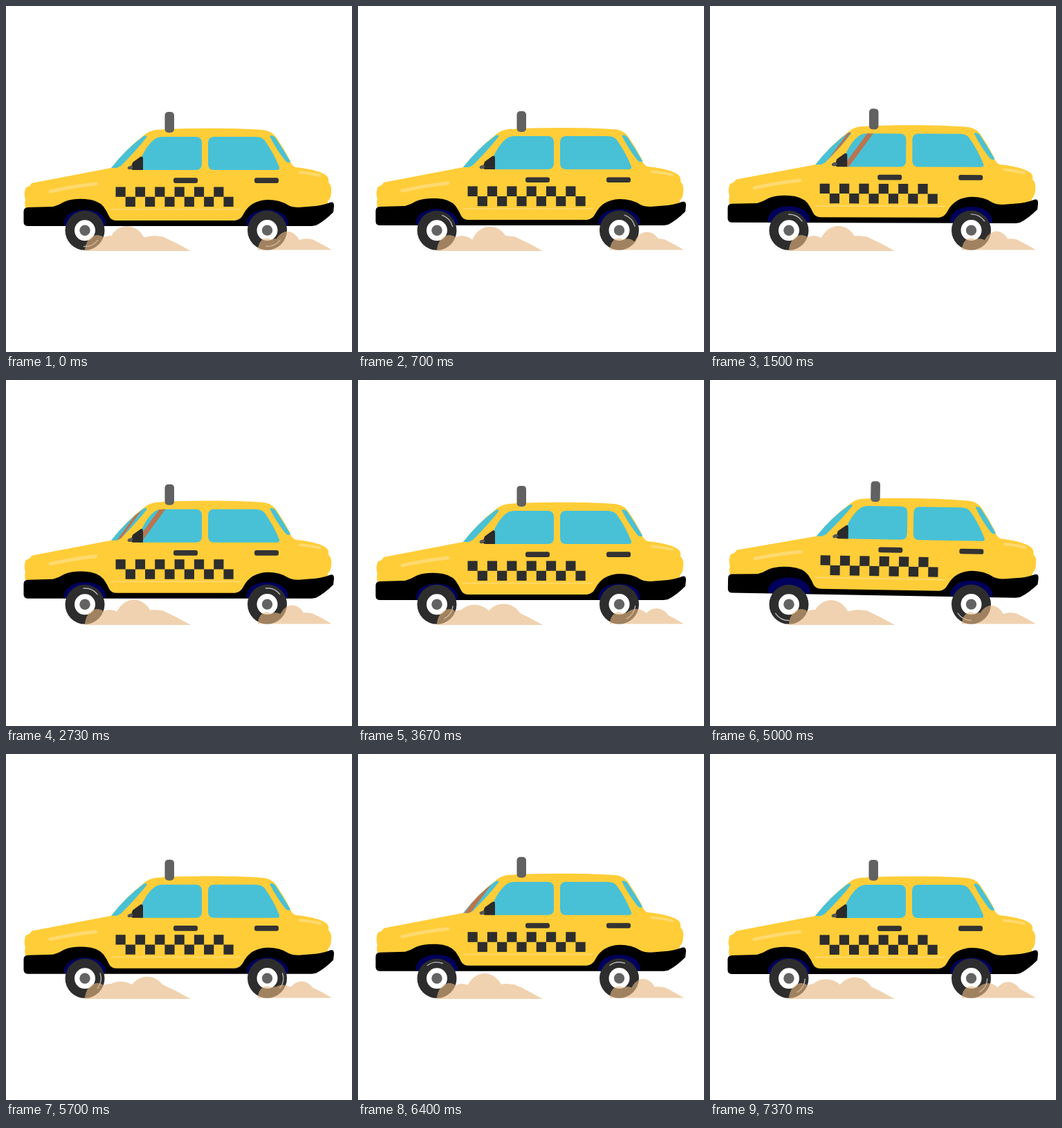
An HTML page for the animation above (7.41 s loop, 500x500 px).

```html
<!DOCTYPE html>
<html lang="en">
<head>
<meta charset="utf-8">
<title>Taxi</title>
<style>
  html, body { margin: 0; width: 100%; height: 100%; overflow: hidden; background: #fff; }
  svg { display: block; width: 100%; height: 100%; }
</style>
</head>
<body>
<svg viewBox="0 0 500 500">
  <defs>
    <clipPath id="glass">
      <path id="screen" d="M152 234Q174 206 199 188Q205 186 203 190Q189 208 166 231L160 234Z"/>
      <path id="frontGlass" d="M192 237L194 222Q204 200 214 193Q219 189 227 189H274Q283 189 283 198V228Q283 237 274 237Z"/>
      <path id="rearGlass" d="M292 198Q292 189 301 189H360Q371 189 375 196Q387 213 395 233Q396 237 391 237H301Q292 237 292 228Z"/>
    </clipPath>
    <path id="arch" d="M83.500 317C83 302 97 294.500 114 294.500S145 302 144.500 317Z" fill="#00005c"/>
    <g id="wheel">
      <circle r="28.500" fill="#2d2d2d"/>
      <circle r="15" fill="#fff"/>
      <circle r="7.700" fill="#636363"/>
    </g>
    <path id="shine" d="M-11 -20.500A23.300 23.300 0 0 1 11 -20.500" fill="none" stroke="#b8b8b8" stroke-width="1.400" stroke-linecap="round"/>
  </defs>

  <g id="body">
    <path fill="#ffcd38" d="M29 294Q26 286 28 280Q25 270 29 262Q35 261 37 256L152 234Q174 206 199 187Q207 180 217 179C260 176 340 176 374 179.500Q384 181 390 189Q401 205 410 222Q412 230 418 233C438 235 457 239 464 246Q467 250 466 255Q471 259 470 268Q470 278 465 282V294L410 312H100Z"/>
    <rect x="229.500" y="153" width="13.500" height="30" rx="5" fill="#616161"/>
    <g fill="#48c1d6">
      <use href="#screen"/><use href="#frontGlass"/><use href="#rearGlass"/>
      <path d="M381 188Q385 186 389 190Q400 206 411 225Q408 228 404 224Q391 208 381 188Z"/>
    </g>
    <g clip-path="url(#glass)">
      <g id="glare" stroke="#b9754f" fill="none">
        <path d="M22 181L-22 241" stroke-width="7"/>
        <path d="M-9 181L-53 241" stroke-width="3.500"/>
      </g>
    </g>
    <path d="M180 235L183 226L194 218Q198 216 198 221V237H183Z" fill="#2b2b2b"/>
    <ellipse cx="179.500" cy="233.500" rx="4" ry="2.500" fill="#555" transform="rotate(-20 179.500 233.500)"/>
    <g fill="#333">
      <rect x="242" y="248.300" width="35" height="7.700" rx="3"/>
      <rect x="359" y="248.300" width="35" height="7.700" rx="3"/>
    </g>
    <path id="checks" fill="#2d2d2d"/>
    <g fill="none" stroke="#ffda70" stroke-linecap="round">
      <path d="M64 268Q100 260 130 257" stroke-width="5"/>
      <path d="M425 240.500Q440 241.500 454 245" stroke-width="4"/>
      <path d="M152 293.700H339" stroke-width="1.600"/>
    </g>
    <path d="M25.500 297Q25.500 291 32 291L68 290Q76 288 84 283Q96 278 114 279Q133 280 141 290Q146 297 149 304Q152 310 160 310H331Q339 309 343 301Q353 281 378 280Q396 280 408 288Q413 291 423 291L448 289Q461 287 468 284Q474 282 474 289L473 298Q460 311 448 317L442 318H32Q25.500 318 25.500 312Z"/>
    <use href="#arch"/><use href="#arch" x="263.500"/>
  </g>

  <g transform="translate(114 324.300)"><use href="#wheel"/><use href="#shine" class="spin"/></g>
  <g transform="translate(377.500 324.100)"><use href="#wheel"/><use href="#shine" class="spin"/></g>

  <g fill="#e7b680" fill-opacity=".62">
    <path class="dust" transform="translate(114 354)"/>
    <path class="dust" transform="translate(364 352.500) scale(.7 .74)"/>
  </g>
</svg>
<script>
  const LOOP = 7410, ROAD = LOOP / 2, GLARE = LOOP / 6, BEAT = LOOP / 18;
  const body = document.getElementById('body');
  const glare = document.getElementById('glare');
  const spins = document.querySelectorAll('.spin');
  const dusts = document.querySelectorAll('.dust');

  let checks = '';
  for (let i = 0; i < 12; i++) {
    checks += `M${158.500 + i * 14.180} ${261.500 + (i % 2) * 14.300}h14.2v14.300h-14.2z`;
  }
  document.getElementById('checks').setAttribute('d', checks);

  // Age in beats, horizontal position, height of one drifting puff
  const PUFF = [
    [-.45, 42, 8], [-.087, 54, 29], [0, 61, 36], [.146, 61, 36], [.55, 69, 37],
    [.64, 71, 36.5], [.913, 96, 31], [1, 102, 21], [1.55, 106, 20], [1.85, 112, 8]
  ];

  const ease = u => (1 - Math.cos(Math.PI * u)) / 2;
  const hump = (t, centre, half) =>
    Math.abs(t - centre) < half ? Math.cos((t - centre) / half * Math.PI / 2) ** 2 : 0;

  function puffAt(age) {
    let i = 1;
    while (i < PUFF.length - 1 && age > PUFF[i][0]) i++;
    const [a, b] = [PUFF[i - 1], PUFF[i]];
    const u = Math.min(1, Math.max(0, (age - a[0]) / (b[0] - a[0])));
    return [a[1] + (b[1] - a[1]) * u, a[2] + (b[2] - a[2]) * u];
  }

  const dome = (x, w, h) => `M${x - w} 0A${w} ${h} 0 0 1 ${x + w} 0Z`;

  function dustPath(q) {
    let d = dome(18, 18, 23) + dome(36, 22, 22) + dome(100, 29, 22)
      + 'M78 0L84 -20L112 -21Q134 -11 153 0Z';
    for (const age of [q - 1, q, q + 1]) {
      if (age < -.45 || age > 1.85) continue;
      const [x, h] = puffAt(age);
      d += dome(x, 29, h);
    }
    return d;
  }

  function bob(p) {
    if (p < 190) return 5 * ease(p / 190);
    if (p < 320) return .3 + 4.7 * (1 - ease((p - 190) / 130));
    return .3 * (1 - ease((p - 320) / (BEAT - 320)));
  }

  function draw(t) {
    const road = t % ROAD, beat = t % BEAT;
    const front = bob(beat) + 9.3 * hump(road, 1320, 300);
    const rear = bob(beat) + 2.4 * hump(road, 1400, 360);
    const tilt = (front - rear) / 410 * 180 / Math.PI;
    body.setAttribute('transform',
      `translate(0 ${-(front + rear) / 2}) rotate(${tilt} 245 330)`);

    glare.setAttribute('transform', `translate(${t % GLARE - 51} 0)`);

    const turn = (beat - 235) / BEAT * 360;
    spins.forEach(s => s.setAttribute('transform', `rotate(${turn})`));

    const d = dustPath(beat / BEAT);
    dusts.forEach(p => p.setAttribute('d', d));
  }

  const start = performance.now();
  function tick() {
    draw((performance.now() - start) % LOOP);
    requestAnimationFrame(tick);
  }
  draw(0);
  requestAnimationFrame(tick);
</script>
</body>
</html>
```
